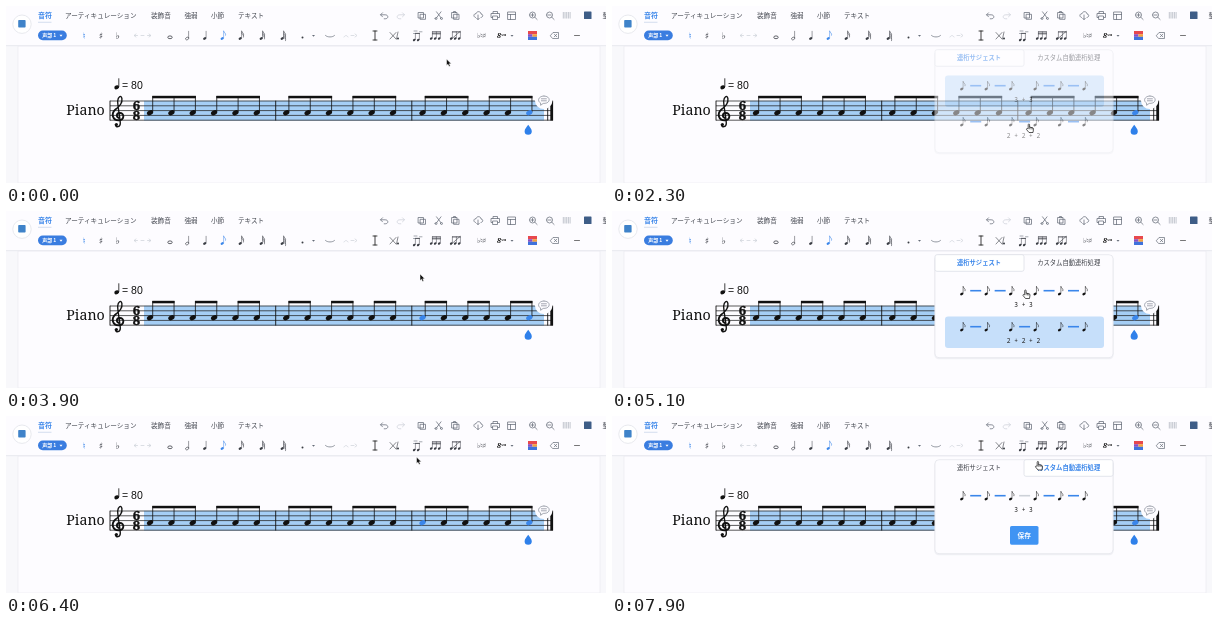
Recreate the animation shown at these times as an HTML page. Size 600 px wide and 177 px high, loop 8 s.

```html
<!DOCTYPE html>
<html lang="ja">
<head>
<meta charset="utf-8">
<style>
html, body { margin: 0; width: 100%; height: 100%; overflow: hidden; background: #fdfcff; }
svg { display: block; width: 600px; height: 177px; }
text { font-family: "Noto Sans CJK JP", "Noto Sans CJK", "Noto Sans", sans-serif; }
.serif { font-family: "Noto Serif", serif; }
.arial { font-family: "Liberation Sans", sans-serif; }
.mono { font-family: "Noto Sans Mono", monospace; }
.symbol { font-family: "DejaVu Sans", sans-serif; }
</style>
</head>
<body>
<svg id="stage" viewBox="0 0 600 177"></svg>
<script>
const BLUE = '#3a86ea', INK = '#111', SOFT = '#3a3d44', GREY = '#666d79', PALE = '#cdd1d8';
const SELECT = '#a5cef5', PAPER = '#fdfcff', EDGE = '#e6e7ed';
const stage = document.getElementById('stage');

function add(parent, tag, attrs, content) {
  const el = document.createElementNS('http://www.w3.org/2000/svg', tag);
  for (const key in attrs) el.setAttribute(key, attrs[key]);
  if (content) el.textContent = content;
  parent.appendChild(el);
  return el;
}
const group = (parent, attrs = {}) => add(parent, 'g', attrs);
const rect = (p, x, y, width, height, fill, more) => add(p, 'rect', { x, y, width, height, fill, ...more });
const stroke = (p, d, color, width = 0.8, more) => add(p, 'path',
  { d, fill: 'none', stroke: color, 'stroke-width': width, 'stroke-linecap': 'round', 'stroke-linejoin': 'round', ...more });
const line = (p, d, color, width) => stroke(p, d, color, width, { 'stroke-linecap': 'butt' });
const label = (p, x, y, size, fill, content, more) =>
  add(p, 'text', { x, y, 'font-size': size, fill, ...more }, content);
const MIDDLE = { 'text-anchor': 'middle' };

function head(p, cx, cy, rx, ry, color, hollow) {
  return add(p, 'ellipse', { cx, cy, rx, ry, transform: `rotate(-28 ${cx} ${cy})`,
    fill: hollow ? 'none' : color, stroke: hollow ? color : 'none', 'stroke-width': 0.6 });
}

// Small note with a stem and any number of flags; (x, y) is its centre.
function smallNote(p, x, y, flags, color = SOFT, hollow = false) {
  head(p, x - 0.8, y + 3, 1.7, 1.2, color, hollow);
  const sx = x + 0.6;
  line(p, `M${sx} ${y + 2.8}V${y - 4.6}`, color, 0.5);
  for (let i = 0; i < flags; i++) {
    const fy = y - 4.4 + i * 1.8;
    stroke(p, `M${sx} ${fy}c.2 1.7 2.8 1.9 2 4.2`, color, 0.55);
  }
}

function beamedIcon(p, x, y, count, beams) {
  const w = (count - 1) * 4;
  for (let i = 0; i < count; i++) {
    const nx = x - w / 2 + i * 4;
    head(p, nx - 0.8, y + 3, 1.4, 1, SOFT);
    line(p, `M${nx + 0.4} ${y + 3}V${y - 4}`, SOFT, 0.5);
  }
  for (let b = 0; b < beams; b++)
    line(p, `M${x - w / 2} ${y - 3.6 + b * 1.9}h${w + 0.8}`, SOFT, 0.9);
}

function drawBackdrop() {
  rect(stage, 0, 0, 600, 177, '#f8f8fb');
  rect(stage, 12, 40, 582, 137, PAPER, { stroke: '#eaebf0', 'stroke-width': 0.7 });
  rect(stage, 0, 0, 600, 39.5, PAPER);
  rect(stage, 0, 39.3, 600, 0.9, EDGE);
  add(stage, 'circle', { cx: 16, cy: 18.2, r: 9.2, fill: '#fff', stroke: EDGE, 'stroke-width': 0.9 });
  rect(stage, 12.2, 13.9, 7.4, 7.6, '#3f83c9', { rx: 0.8 });
}

function drawMenu() {
  const items = [[32, '音符'], [59, 'アーティキュレーション'], [145, '装飾音'], [178.5, '強弱'], [205, '小節'], [232, 'テキスト']];
  items.forEach(([x, name], i) =>
    label(stage, x, 11.8, i ? 6.6 : 7, i ? '#40444d' : BLUE, name, { 'font-weight': i ? 500 : 700 }));
  rect(stage, 32, 15.8, 13.5, 0.8, '#c9d6ea');

  const g = group(stage);
  const icon = (d, color = GREY) => stroke(g, d, color, 0.75);
  icon('M376.5 6.8l-2 2 2 2M374.7 8.8h4.5c3.5 0 3.5 4 0 4h-1');
  icon('M396.5 6.8l2 2-2 2M398.3 8.8h-4.5c-3.5 0-3.5 4 0 4h1', PALE);
  icon('M412.5 6.5h5v5.5h-5zM414.5 8.3h5v5h-5z');
  icon('M430.5 5.8l4.5 6M435 5.8l-4.5 6M429 12.5a1 1 0 1 0 2 0 1 1 0 1 0-2 0M434.5 12.5a1 1 0 1 0 2 0 1 1 0 1 0-2 0');
  icon('M446 6.5h5v5.5h-5zM448 8.3h5v5h-5zM447.5 6.5v-1h2v1');
  icon('M469.5 11.5c-2.5-.5-2-4 .5-3.8.8-3 5-2.5 5 .3 2.4 0 2.4 3.3 0 3.5M472 9v4.5M470.7 12.3l1.3 1.3 1.3-1.3');
  icon('M487 7.5v-2h4.5v2M486.5 11.5h-1.5v-4h8.5v4h-1.5M487 10h4.5v3.5h-4.5z');
  icon('M502 6h7.5v7.5h-7.5zM502 8.5h7.5M504.5 8.5v5');
  [527, 544].forEach((x, i) => icon(
    `M${x - 3.5} 9a3 3 0 1 0 6 0 3 3 0 1 0-6 0M${x + 1.8} 11.2l2.3 2.3M${x - 2} 9h3${i ? '' : `M${x - 0.5} 7.5v3`}`));
  for (let i = 0; i < 5; i++) line(g, `M${557.3 + i * 1.7} 6v6.5`, '#9ba2ae', 0.6);
  rect(g, 578, 5.5, 7.5, 7.5, '#3e5d87', { rx: 0.6 });
  label(g, 596.5, 11.8, 6.6, '#40444d', '整', { 'font-weight': 500 });
}

function drawTools() {
  const g = group(stage), y = 29.5;
  rect(g, 32, 24.6, 28.8, 9.6, '#3a7de0', { rx: 4.8 });
  label(g, 36.2, 31.2, 5, '#fff', '声部 1', { 'font-weight': 700 });
  add(g, 'path', { d: 'M53.5 28.7h3l-1.5 2z', fill: '#fff' });
  [[78, '♮', BLUE], [95, '♯', SOFT], [111.5, '♭', SOFT]].forEach(([x, sign, color]) =>
    label(g, x, 32.8, 9, color, sign, { ...MIDDLE, class: 'symbol' }));
  stroke(g, 'M130 28l-2 1.5 2 1.5M128.5 29.5h3M135 29.5h3M141.5 29.5h3M143 28l2 1.5-2 1.5', PALE, 0.7);

  add(g, 'ellipse', { cx: 164, cy: 31.3, rx: 2.2, ry: 1.4, fill: 'none', stroke: SOFT, 'stroke-width': 0.8 });
  smallNote(g, 182, y, 0, SOFT, true);
  smallNote(g, 199.5, y, 0);
  [[217, 1, BLUE], [235, 2], [256, 3], [277, 4]].forEach(([x, flags, color]) => smallNote(g, x, y, flags, color));
  add(g, 'circle', { cx: 296.5, cy: 31.5, r: 1, fill: SOFT });
  add(g, 'path', { d: 'M306 29h3l-1.5 1.8z', fill: GREY });
  stroke(g, 'M319.5 29.5c2 2 7 2 9 0', GREY, 0.7);
  stroke(g, 'M338 31c1-2 3-2 4 0M345 29.5h3M349 28l2 1.5-2 1.5', PALE, 0.7);
  stroke(g, 'M367 25h4M369 25v9M367 34h4', INK, 0.8);
  stroke(g, 'M384 26.5l6 6.5M390 26.5l-6 6.5M392 26l-1.5 7', SOFT, 0.6);
  add(g, 'circle', { cx: 392, cy: 32.5, r: 1, fill: SOFT });

  beamedIcon(g, 411, 31, 2, 1);
  stroke(g, 'M407.5 27.5h2M413.5 25.8h2.5M408 25h3', GREY, 0.6);
  beamedIcon(g, 430, y, 3, 2);
  beamedIcon(g, 450, y, 3, 1);
  stroke(g, 'M445 33.5l9-8', SOFT, 0.6);
  label(g, 475.5, 32.3, 7, SOFT, '♭♮♯', { ...MIDDLE, class: 'symbol' });
  label(g, 491, 32, 7, INK, '8', { class: 'serif', 'font-weight': 700, 'font-style': 'italic' });
  label(g, 495.2, 30, 4, INK, 'va', { class: 'serif', 'font-weight': 700, 'font-style': 'italic' });
  add(g, 'path', { d: 'M504.5 29h3l-1.5 1.8z', fill: GREY });
  rect(g, 522, 25, 9, 3.2, '#e8484d');
  rect(g, 522, 28.2, 4.5, 2.6, '#8a4fc0');
  rect(g, 526.5, 28.2, 4.5, 2.6, '#f2a03c');
  rect(g, 522, 30.8, 9, 3.2, '#3f72dc');
  stroke(g, 'M544.5 29.5l2.5-3h5.5v6h-5.5zM548.3 28.2l2.5 2.6M550.8 28.2l-2.5 2.6', GREY, 0.7);
  stroke(g, 'M568.5 29.5h5', '#555', 0.8);
}

const STARTS = [144, 280.2, 416.5], STEP = 21.35, STAFF_TOP = 95, GAP = 4.8;
let tappedHead;

function beams(size) {
  const g = group(stage);
  for (const x of STARTS)
    for (let i = 0; i < 6; i += size)
      rect(g, x + i * STEP + 2.3, 89.8, (size - 1) * STEP + 0.9, 2.5, INK);
  return g;
}

function drawScore() {
  const g = group(stage);
  rect(g, 138, 94.8, 400, 19.8, SELECT);
  for (let i = 0; i < 5; i++) line(g, `M104 ${STAFF_TOP + i * GAP}H547`, '#222', 0.75);
  for (const x of [104, 269.7, 405.8, 541.7]) line(g, `M${x} 94.7V114.5`, INK, 0.9);
  rect(g, 544.3, 94.7, 2.8, 19.8, INK);
  label(g, 60.3, 109, 14.2, INK, 'Piano', { class: 'serif', 'font-weight': 500 });

  head(g, 110.7, 81.3, 2.5, 1.9, INK);
  line(g, 'M112.8 81V72.3', INK, 0.8);
  label(g, 116, 83, 10.5, INK, '= 80', { class: 'arial' });

  stroke(g, 'M113 112C110.2 111.2 110 107.4 113.5 107C118.6 106.6 118.8 113.7 113 114.3C106.3 114.5 104.8 107.6 109.5 103.4', INK, 1.9);
  stroke(g, 'M109.5 103.4C114 99.3 116.6 97 115.9 92.5C115 88.4 112 91 111.7 95C111.4 99 114.2 112 114.3 117.2C114.2 121.6 109.6 121.6 109.4 118.8', INK, 1.35);
  add(g, 'circle', { cx: 110.4, cy: 118.6, r: 1.6, fill: INK });
  const meter = { ...MIDDLE, class: 'serif', 'font-weight': 900, stroke: INK, 'stroke-width': 0.4 };
  label(g, 130.5, 104.4, 13.2, INK, '6', meter);
  label(g, 130.5, 114.2, 13.2, INK, '8', meter);

  STARTS.forEach((start, bar) => {
    for (let i = 0; i < 6; i++) {
      const x = start + i * STEP;
      line(g, `M${x + 2.7} 106.3V90`, INK, 0.8);
      const el = head(g, x, 106.8, 3.3, 2.3, bar === 2 && i === 5 ? BLUE : INK);
      if (bar === 2 && i === 0) tappedHead = el;
    }
  });
  add(g, 'circle', { cx: 537.7, cy: 94.3, r: 8.8, fill: PAPER });
  stroke(g, 'M538 90c7 0 7 7.4 0 7.4h-.8l-2.6 1.9v-2.3c-3.7-2-2.2-7 3.4-7M535.4 92.8h5M535.4 94.8h5', '#878d98', 0.75);
  add(g, 'path', { d: 'M522.2 118.8c1.3 2.2 3.6 4 3.6 6.4a3.6 3.6 0 0 1-7.2 0c0-2.4 2.3-4.2 3.6-6.4z', fill: '#2f80ea' });
}

// Row of six eighth notes; links holds one colour or null per gap.
function noteRow(p, y, links, caption) {
  for (let i = 0; i < 6; i++) {
    const x = 350.5 + i * 24.45;
    smallNote(p, x, y, 1, INK);
    if (links[i]) line(p, `M${x + 7.7} ${y - 0.3}h11`, links[i], 1.6);
  }
  label(p, 411.5, y + 16, 6.2, '#222', caption, { ...MIDDLE, class: 'mono' });
}

function drawPopup() {
  const root = group(stage);
  const shadow = rect(root, 322.3, 44, 179.4, 0, '#e4e6ec', { rx: 4.5, opacity: 0.5 });
  const panel = rect(root, 323, 43.7, 178, 0, PAPER, { rx: 4, stroke: '#e2e4ea', 'stroke-width': 0.7 });
  const tabs = [[367, 323, '連桁サジェスト'], [456.7, 412, 'カスタム自動連桁処理']].map(([mid, left, name]) => ({
    box: rect(root, left, 43.7, 89, 16.6, '#fff', { rx: 2, stroke: '#dde0e8', 'stroke-width': 0.8 }),
    text: label(root, mid, 54.2, 6.3, SOFT, name, MIDDLE)
  }));

  const suggest = group(root);
  const highlight = rect(suggest, 333, 69.5, 159, 31.6, '#c6dffa', { rx: 3 });
  noteRow(suggest, 80, [BLUE, BLUE, null, BLUE, BLUE], '3 + 3');
  noteRow(suggest, 116, [BLUE, null, BLUE, null, BLUE], '2 + 2 + 2');

  const custom = group(root);
  noteRow(custom, 80, [BLUE, BLUE, PALE, BLUE, BLUE], '3 + 3');
  rect(custom, 398, 110, 28.5, 18.7, '#4094f3', { rx: 1.6 });
  label(custom, 412.2, 122, 6.7, '#fff', '保存', { ...MIDDLE, 'font-weight': 700 });
  return { root, shadow, panel, tabs, highlight, suggest, custom };
}

drawBackdrop();
drawMenu();
drawTools();
drawScore();
const threes = beams(3), pairs = beams(2), popup = drawPopup();

const arrow = add(stage, 'path', { d: 'M0 0v6.6l1.5-1.3 1 2.3 1.3-.6-1-2.2h2z', fill: '#111', stroke: '#fff', 'stroke-width': 0.5 });
const hand = group(stage);
add(hand, 'path', { d: 'M-.8 4.8V.7c0-1 1.4-1 1.4 0v2.4l3 .7c.8.2 1 .7.9 1.4l-.5 3.3h-4L-2.4 5.6c-.5-.9.5-1.5 1.6-.8z',
  fill: '#fff', stroke: '#111', 'stroke-width': 0.7, 'stroke-linejoin': 'round' });
stroke(hand, 'M.6 3.1v1.8M2 3.5v1.5M3.3 3.8v1.4', '#111', 0.5);

const LOOP = 8000, TICK = 100;
const POINTER = [
  [0, 440.5, 53], [100, 440.5, 53], [200, 437, 55], [400, 432, 51], [600, 411, 30], [1400, 411, 30],
  [2100, 417, 118], [3300, 417, 118], [3900, 414, 63], [4000, 411, 43], [4300, 410.5, 31], [4500, 411, 31],
  [5000, 413.5, 79], [6000, 413.5, 79], [6400, 410.5, 41], [6600, 411, 30], [7200, 411, 30],
  [7500, 426, 45.5], [8000, 426, 45.5]
];
const OPEN = [[700, 2300], [4500, 5300], [6800, 9000]];
const PAIRED = [3200, 5800], TAPPED = [[3300, 5800], [6100, LOOP]], CUSTOM_AT = 7700;

const within = (t, [from, to]) => t >= from && t < to;
const show = (el, on) => el.setAttribute('display', on ? 'inline' : 'none');

function pointerAt(t) {
  const i = POINTER.findIndex(p => p[0] > t);
  const [t0, x0, y0] = POINTER[i - 1], [t1, x1, y1] = POINTER[i];
  const k = (t - t0) / (t1 - t0), ease = k * k * (3 - 2 * k);
  return [x0 + (x1 - x0) * ease, y0 + (y1 - y0) * ease];
}

function popupOpacity(t) {
  const fade = 200;
  return Math.max(...OPEN.map(([from, to]) =>
    Math.max(0, Math.min(1, (t - from + TICK) / fade, (to + TICK - t) / fade))));
}

function render(time) {
  const t = Math.floor((time % LOOP) / TICK) * TICK;
  const opacity = popupOpacity(t), paired = within(t, PAIRED), custom = t >= CUSTOM_AT;
  show(threes, !paired);
  show(pairs, paired);
  tappedHead.setAttribute('fill', TAPPED.some(span => within(t, span)) ? BLUE : INK);

  const height = custom ? 94 : 103;
  popup.root.setAttribute('opacity', opacity);
  popup.panel.setAttribute('height', height);
  popup.shadow.setAttribute('height', height + 1.2);
  popup.highlight.setAttribute('y', paired ? 105.5 : 69.5);
  show(popup.suggest, !custom);
  show(popup.custom, custom);
  popup.tabs.forEach(({ box, text }, i) => {
    const active = custom === (i === 1);
    text.setAttribute('fill', active ? BLUE : SOFT);
    text.setAttribute('font-weight', active ? 700 : 500);
    show(box, active);
  });

  const [x, y] = pointerAt(t), pointing = opacity > 0 || y < 37;
  show(hand, pointing);
  show(arrow, !pointing);
  (pointing ? hand : arrow).setAttribute('transform', `translate(${x} ${y})`);
}

const begin = performance.now();
function frame() {
  render(performance.now() - begin);
  requestAnimationFrame(frame);
}
frame();
</script>
</body>
</html>
```
